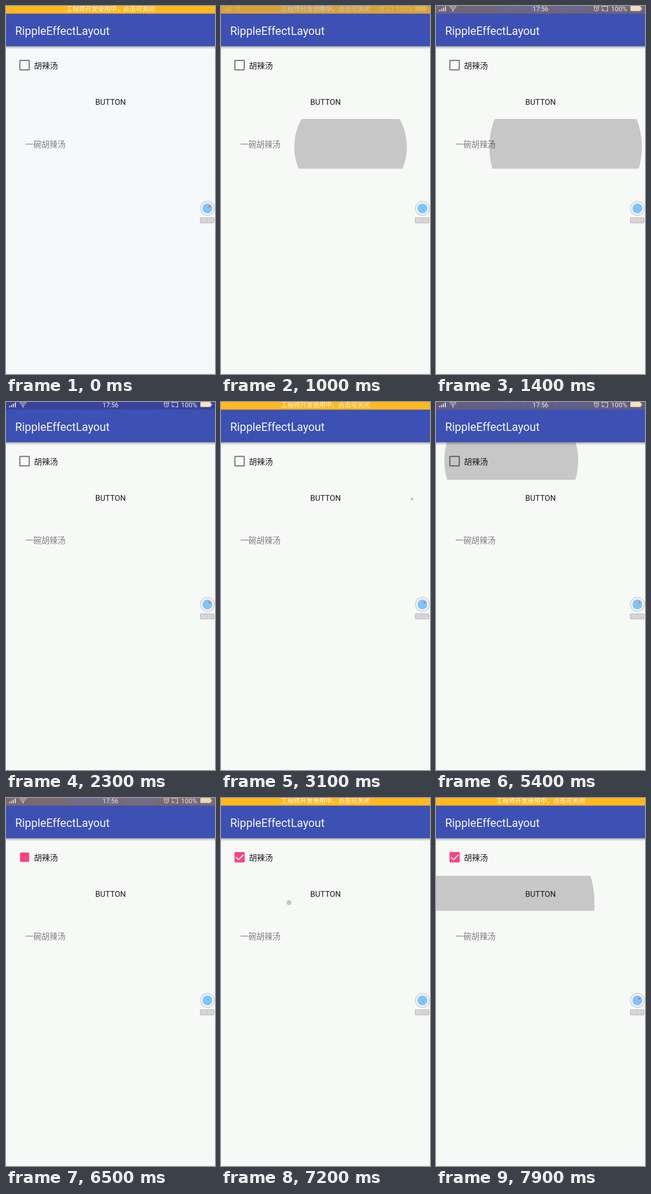
An HTML page with a canvas that plays this animation: 400 px wide and 700 px high, repeating every 8000 ms.

```html
<!DOCTYPE html>
<html lang="zh">
<head>
<meta charset="utf-8">
<style>
html, body { margin: 0; height: 100%; overflow: hidden; }
canvas { display: block; }
</style>
</head>
<body>
<canvas id="stage" width="400" height="700"></canvas>
<script>
const c = document.getElementById('stage').getContext('2d');
const LOOP = 8000;
const LATIN = 'Roboto, "Liberation Sans", sans-serif';
const HAN = '"Noto Sans CJK SC", "Noto Sans CJK", sans-serif';

// Touch ripples: start time, row top and bottom, centre, final radius
const ripples = [
  { start: 610, top: 215, bottom: 309.5, x: 248, y: 268, r: 146 },
  { start: 3094, top: 148, bottom: 214.5, x: 365.5, y: 184.5, r: 160 },
  { start: 4810, top: 77, bottom: 148, x: 144, y: 111, r: 137.5 },
  { start: 7190, top: 148, bottom: 214.5, x: 130, y: 199, r: 175.5 }
];
const RIPPLE_TIME = 800;
const ticks = [1380, 2330, 3300, 4350, 5300, 6250, 7000];

const clamp = v => Math.max(0, Math.min(1, v));
const ramp = (t, start, length) => clamp((t - start) / length);
const mix = (a, b, k) => `rgb(${a.map((v, i) => Math.round(v + (b[i] - v) * k))})`;

function rect(x, y, w, h, color, radius = 0) {
  c.fillStyle = color;
  c.beginPath();
  c.roundRect(x, y, w, h, radius);
  c.fill();
}

function disc(x, y, r, color) {
  c.fillStyle = color;
  c.beginPath();
  c.arc(x, y, r, 0, 7);
  c.fill();
}

function line(points, color, width) {
  c.strokeStyle = color;
  c.lineWidth = width;
  c.beginPath();
  points.forEach(([x, y]) => c.lineTo(x, y));
  c.stroke();
}

function arc(x, y, r, from, to, width) {
  c.lineWidth = width;
  c.beginPath();
  c.arc(x, y, r, from, to);
  c.stroke();
}

function text(str, x, y, size, color, family = LATIN, align = 'left') {
  c.font = `${size}px ${family}`;
  c.textAlign = align;
  c.fillStyle = color;
  c.fillText(str, x, y);
}

function statusIcons() {
  const ink = '#f3ecdf';
  for (let i = 0; i < 4; i++) rect(6 + i * 3.7, 7.5 - i * 2.2, 1.8, 2.5 + i * 2.2, ink);
  c.strokeStyle = ink;
  for (const r of [3.5, 6.5, 9.5]) arc(32.5, 9.5, r, -2.3, -0.84, 1.2);
  disc(32.5, 9, 1.2, ink);
  text('17:56', 200, 10, 12.2, ink, LATIN, 'center');

  c.strokeStyle = ink;
  arc(307, 5.5, 4, 0, 7, 1.1);
  line([[307, 3], [307, 6], [309, 6]], ink, 1);
  line([[302, 2.5], [304, 0.5]], ink, 1.1);
  line([[310, 0.5], [312, 2.5]], ink, 1.1);
  line([[317.5, 3], [317.5, 0.8], [328.5, 0.8], [328.5, 9.5], [324.5, 9.5]], ink, 1.1);
  for (const r of [2, 4.3]) arc(317, 10, r, -1.57, 0, 1.1);
  text('100%', 335, 9.6, 12.8, ink);
  rect(372, 0, 20, 9.5, '#f6e3c0', 1.5);
  rect(392.5, 3, 1.5, 4, '#f6e3c0');
}

function statusBar(t) {
  const notice = t < 2270 ? 1 - ramp(t, 850, 800)
    : t < 4800 ? ramp(t, 2270, 800)
    : t < 6220 ? 1 - ramp(t, 4800, 800)
    : ramp(t, 6220, 800);
  rect(0, 0, 400, 14.5, mix([48, 63, 159], [255, 185, 31], notice));
  c.globalAlpha = clamp(notice * 3);
  text('工程师开发使用中，点击可关闭', 200, 10.2, 12.15,
    mix([76, 98, 184], [255, 250, 238], notice * notice), HAN, 'center');
  c.globalAlpha = clamp((1 - notice) * 1.4);
  statusIcons();
  c.globalAlpha = 1;
}

function appBar() {
  const shade = c.createLinearGradient(0, 76, 0, 82);
  shade.addColorStop(0, 'rgba(0,0,0,.32)');
  shade.addColorStop(1, 'rgba(0,0,0,0)');
  rect(0, 76, 400, 6, shade);
  rect(0, 14, 400, 62.5, '#3d50b4');
  text('RippleEffectLayout', 17.5, 55, 21.6, '#f7f8fd');
}

function checkbox(t) {
  const fill = ramp(t, 6350, 150);
  const tick = ramp(t, 6510, 180);
  if (!fill) {
    c.strokeStyle = '#6b6b6b';
    c.lineWidth = 2;
    c.beginPath();
    c.roundRect(26.5, 103.5, 18, 18, 1);
    c.stroke();
    return;
  }
  const inset = 1 - tick;
  rect(25.8 + inset, 102.8 + inset, 19.6 - 2 * inset, 19.6 - 2 * inset, '#ff4081', 2);
  if (fill < 1) {
    const hole = 8 * (1 - fill);
    rect(35.5 - hole, 112.5 - hole, 2 * hole, 2 * hole, '#f7f9f7');
  }
  if (tick) {
    const a = clamp(tick * 3), b = clamp(tick * 1.5 - 0.5);
    line([[28.5, 112.5], [28.5 + 5 * a, 112.5 + 5 * a],
      [28.5 + 5 * a + 9.5 * b, 112.5 + 5 * a - 9.5 * b]], '#fff', 2.2);
  }
}

function ripple(t, { start, top, bottom, x, y, r }) {
  const p = (t - start) / RIPPLE_TIME;
  if (p < 0 || p > 1) return;
  c.save();
  c.beginPath();
  c.rect(0, top, 400, bottom - top);
  c.clip();
  disc(x, y, r * (1 - (1 - p) ** 2), 'rgba(0,0,0,.2)');
  c.restore();
}

function recorder(t) {
  disc(385.5, 385, 14.5, '#dadbda');
  disc(385.5, 385, 11.8, '#fafbfb');
  disc(385.5, 385, 9.6, '#7fc4fd');
  const dark = t > 850 && (t - 850) % 2670 < 1050;
  if (!dark) disc(389.3, 381.2, 2.2, '#f2707c');
  rect(371, 402, 28, 11.5, '#c9cac9', 2.5);
  const seconds = ticks.filter(v => t >= v).length;
  text('00:0' + seconds, 385, 411.2, 9.4, '#f1f2f1', LATIN, 'center');
}

function draw(t) {
  rect(0, 0, 400, 700, t < 600 ? '#f5f9fa' : '#f7f9f7');
  checkbox(t);
  text('胡辣汤', 53.5, 118.8, 15.3, '#1c1c1c', HAN);
  text('BUTTON', 200, 188, 15.2, '#1c1c1c', LATIN, 'center');
  text('一碗胡辣汤', 37, 268.8, 15.4, '#7d7d7d', HAN);
  ripples.forEach(r => ripple(t, r));
  appBar();
  statusBar(t);
  recorder(t);
}

const begin = performance.now();
function frame() {
  draw((performance.now() - begin) % LOOP);
  requestAnimationFrame(frame);
}
frame();
</script>
</body>
</html>
```
